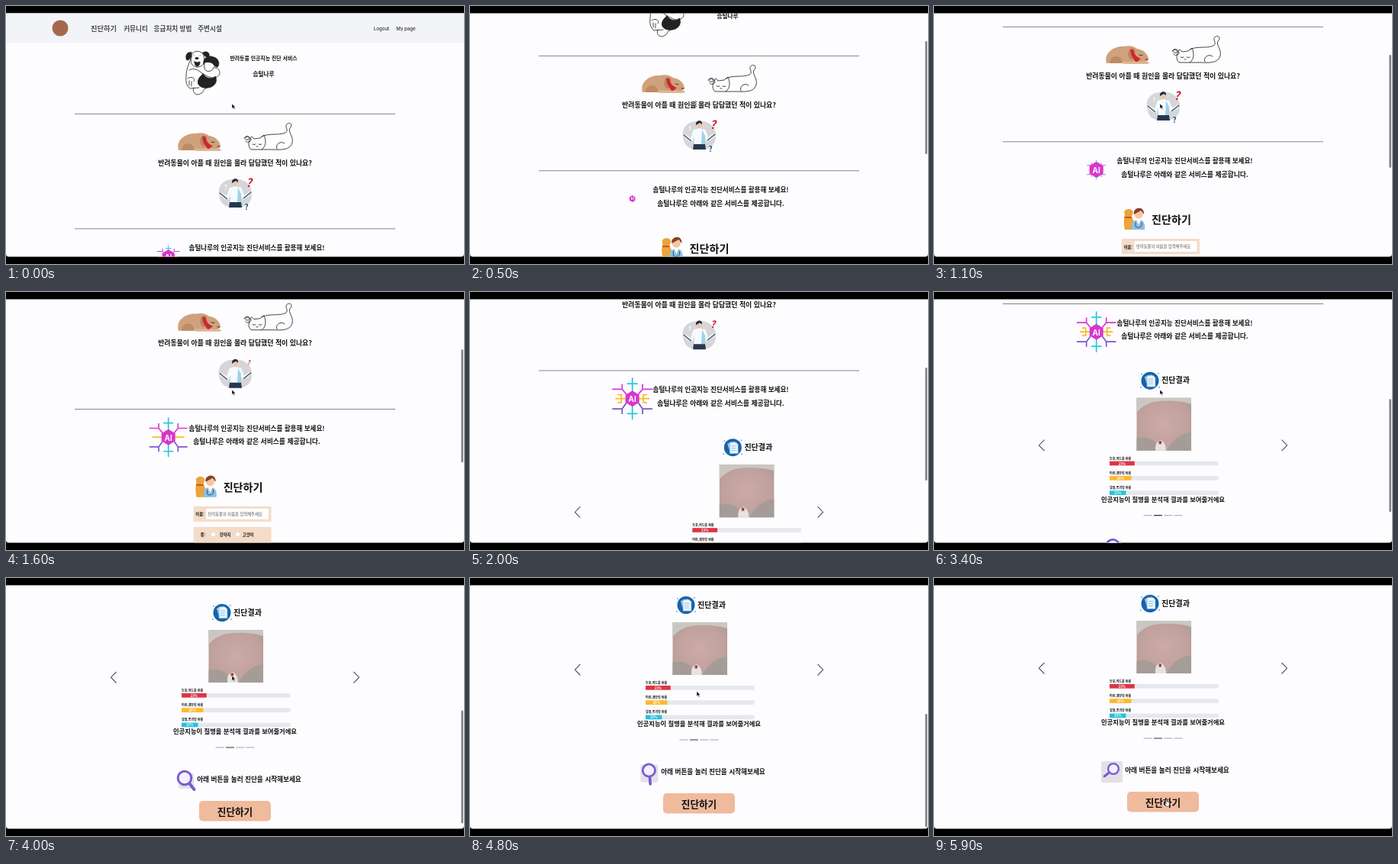
Write an HTML page that moves like this. It is 600 px wide and 338 px high and loops after 6 s.

```html
<!DOCTYPE html>
<html lang="ko">
<head>
<meta charset="utf-8">
<style>
  html, body { margin: 0; width: 100%; height: 100%; overflow: hidden; background: #000; }
  svg { display: block; width: 600px; height: 338px; }
  text { font: 700 8.8px "Noto Sans CJK KR", "Noto Sans CJK", sans-serif; text-anchor: middle; dominant-baseline: central; fill: #111; }
  .nav text { font-size: 8.6px; fill: #4a4a4c; }
  .nav .user { font: 500 6.1px Inter, sans-serif; fill: #333; }
  .ink { fill: none; stroke: #1b1b1b; stroke-width: .8; stroke-linecap: round; stroke-linejoin: round; }
  .ink .solid { fill: #222; }
  .small text { font-size: 4px; text-anchor: start; }
  .small .value { font-size: 4.4px; text-anchor: middle; fill: #fff; }
  .form text { font-size: 5.3px; }
  .rays { fill: none; stroke-width: 1.7; stroke-linecap: round; }
</style>
</head>
<body>
<svg viewBox="0 0 600 338">
  <defs>
    <clipPath id="window"><path d="M0 9.5H600V325Q600 328.5 596 328.5H4Q0 328.5 0 325Z"/></clipPath>
    <clipPath id="carousel"><rect x="90" y="370" width="420" height="210"/></clipPath>
    <radialGradient id="skin" cx=".5" cy=".5" r=".72">
      <stop offset="0" stop-color="#cbaaa7"/>
      <stop offset=".65" stop-color="#c0a09d"/>
      <stop offset="1" stop-color="#a39a96"/>
    </radialGradient>
  </defs>
  <g clip-path="url(#window)">
    <rect width="600" height="338" fill="#fdfcfe"/>
    <g id="page">
      <g class="nav">
        <rect y="9" width="600" height="39" fill="#f3f4f8"/>
        <circle cx="71" cy="29" r="10.5" fill="#a5684c"/>
        <text x="128" y="29" style="font-size:9.2px">진단하기</text>
        <text x="170" y="29">커뮤니티</text>
        <text x="218.5" y="29">응급처치 방법</text>
        <text x="267" y="29">주변시설</text>
        <text class="user" x="492" y="29">Logout</text>
        <text class="user" x="524" y="29">My page</text>
      </g>

      <!-- dog hugging a person -->
      <g class="ink">
        <path d="M243 66C240 76 236 82 236 92C235 100 237 105 241 108L253 107M243 66C243 57 258 57 259 66C262 74 258 80 250 80C243 79 241 74 243 66"/>
        <path class="solid" d="M243 61C237 59 234 66 237 71C241 71 243 66 243 61ZM258 61C264 58 267 62 266 66C262 68 259 65 258 61ZM247 73Q250 75 254 73Q254 79 250 79Q247 78 247 73Z"/>
        <ellipse class="solid" cx="250" cy="68.5" rx="2" ry="1.2"/>
        <path d="M246 65h.2M254 65h.2M260 76C258 84 264 88 270 84L273 79"/>
        <path class="solid" d="M259 76C257 67 267 64 272 67C278 68 281 76 277 80C273 80 272 75 268 74C264 73 261 73 259 76Z"/>
        <path class="solid" d="M258 89C249 96 249 105 259 107C270 109 279 101 274 92C270 97 262 95 258 89Z"/>
        <path d="M273 81C280 80 283 90 276 93C270 96 264 92 258 89M240 84C246 80 252 84 258 89M238 95C243 91 249 95 246 99M246 107C243 114 250 119 256 114C260 112 257 109 262 108M240 98v6M243 99v6"/>
      </g>
      <text x="337.5" y="68" style="font-size:6.9px">반려동물 인공지능 진단 서비스</text>
      <text x="337.5" y="88.5" style="font-size:7.6px">솜털나루</text>
      <path d="M90 141.4H510M90 291.8H510" stroke="#87878a"/>

      <!-- resting dog -->
      <path d="M226 189C222 175 236 166 249 167C256 165 262 167 266 170C275 171 281 178 281 184C279 188 272 189 266 188Z" fill="#cfa27c"/>
      <path d="M230 189C230 180 240 177 245 183L248 189Z" fill="#bd8c66"/>
      <path d="M258 169C252 174 254 182 259 185C263 180 265 173 262 170Z" fill="#b98560"/>
      <path d="M257 171Q258 181 265 188L271 183Q263 181 261 171Z" fill="#cf2433"/>
      <path d="M246 187H281Q283 190 279 190H248Z" fill="#ddb795"/>
      <path d="M269 178q2 1.5 4 .5M277 184h3" class="ink"/>

      <!-- resting cat -->
      <g class="ink">
        <path d="M335 171C345 166 357 170 366 166C372 163 363 157 369 154C373 152 376 156 372 160C369 165 377 171 375 179C373 187 365 189 350 188H321C316 184 318 175 322 171L325 174L333 173L338 169C341 176 341 184 335 188M355 187C352 181 360 176 365 180"/>
        <path d="M323 181q2 1.5 4 0M331 181q2 1.5 4 0M328 184h2M312 173c3-4 7-3 7 0s-6 3-6 0s8-1 8 2s-6 5-7 2"/>
      </g>
      <text x="300" y="205" style="font-size:8.9px">반려동물이 아플 때 원인을 몰라 답답했던 적이 있나요?</text>

      <!-- puzzled man -->
      <path d="M279 247C277 234 286 227 298 227C312 225 323 234 322 247C322 259 313 265 299 264C286 264 280 258 279 247Z" fill="#d6d6d9"/>
      <path d="M295 238L290 252L281 246M306 238L311 251L320 245" fill="none" stroke="#f5faff" stroke-width="4" stroke-linejoin="round"/>
      <path d="M290 253L280 245M311 252L321 244" fill="none" stroke="#33475f" stroke-width="1.3"/>
      <path d="M294 238L300 236L307 238L308 257H294Z" fill="#f5faff"/>
      <path d="M304 238L308 246V257H303Z" fill="#9fd2e6"/>
      <path d="M293 257H308L309 264H292Z" fill="#27384f"/>
      <ellipse cx="300" cy="232" rx="3" ry="4" fill="#efc5a6"/>
      <path d="M296 232C295 225 305 224 304 231L301 229Z" fill="#1f2b3a"/>
      <text id="askWhite" style="fill:#fff;font-size:8px">?</text>
      <text id="askRed" style="fill:#c5202b;font-size:15px;font-style:italic">?</text>
      <text id="askBlue" style="fill:#174a80;font-size:10px">?</text>

      <!-- AI chip -->
      <g id="rays" class="rays">
        <g id="branches">
          <path d="M-8-6L-13-12H-25M-13-12V-18" stroke="#d43bd0"/>
          <path d="M-8 6L-13 13H-25M-13 13V19" stroke="#7d58c4"/>
          <path d="M-9 0H-21" stroke="#f7bd25"/>
          <path class="fork" d="M-14 0V-5H-18M-14 0V5H-18" stroke="#f7bd25"/>
        </g>
        <use href="#branches" transform="scale(-1 1)"/>
        <path d="M0-9V-26M-6-19H6M0 9V26M-6 19H6" stroke="#25c9e0"/>
      </g>
      <g id="chip">
        <path d="M0-10.5L9-5V5L0 10.5L-9 5V-5Z" fill="#d935cf"/>
        <text y=".3" style="fill:#fff;font:700 10px Inter,sans-serif">AI</text>
      </g>
      <text x="328.5" y="316" style="font-size:8.55px">솜털나루의 인공지능 진단서비스를 활용해 보세요!</text>
      <text x="328.5" y="334">솜털나루은 아래와 같은 서비스를 제공합니다.</text>

      <g clip-path="url(#carousel)">
        <g id="formSlide">
          <path d="M250 407C248 398 249 390 250 387C246 380 259 377 261 384L259 390C263 396 262 402 262 407Z" fill="#eba53a"/>
          <path d="M250 391h9" stroke="#c8372f" stroke-width="1.6"/>
          <path d="M259 407C258 397 262 394 268 394C275 394 277 400 276 407Z" fill="#8dbfe2"/>
          <path d="M265 394L268 401L271 394Z" fill="#fff"/>
          <circle cx="268" cy="387" r="5.5" fill="#f7c6a1"/>
          <path d="M262 387C260 377 276 375 275 387L271 382Z" fill="#873f26"/>
          <path d="M264 397v6q4 3 8-1v-5" fill="none" stroke="#2a568c"/>
          <text x="311" y="393" style="font-size:14.1px">진단하기</text>
          <g class="form">
            <rect x="246" y="419" width="102" height="20" rx="1.5" fill="#f4dcc8"/>
            <rect x="262.500" y="422" width="82" height="14" rx="1.500" fill="#fff"/>
            <text x="254.500" y="429.500">이름:</text>
            <text x="300.500" y="429" style="font-weight:400;fill:#555">반려동물의 이름을 입력해주세요</text>
            <rect x="246" y="446" width="102" height="21" rx="1.5" fill="#f4dcc8"/>
            <text x="258.500" y="456">종:</text>
            <circle cx="272" cy="456" r="3" fill="#fff" stroke="#ccc" stroke-width=".5"/>
            <text x="287.500" y="456">강아지</text>
            <circle cx="304" cy="456" r="3" fill="#fff" stroke="#ccc" stroke-width=".5"/>
            <text x="317.500" y="456">고양이</text>
          </g>
        </g>
        <g id="resultSlide">
          <circle cx="283" cy="392.500" r="11.500" fill="#1763aa"/>
          <g id="papers" stroke="#5b9bd0" stroke-width=".6">
            <path d="M276 387l9-3 4 13-9 3Z" fill="#b9dcf5"/>
            <path d="M279 385h8l3 3v12h-11Z" fill="#eaf6ff"/>
            <path d="M281 390h6M281 393h6M281 396h6"/>
          </g>
          <path d="M271 384h2M293 383h2M270 401h2M294 401h2" stroke="#6db5e3" stroke-width="1.500"/>
          <text x="316.500" y="391" style="font-size:10px">진단결과</text>
          <g>
            <rect x="265.500" y="415" width="71.500" height="69" fill="url(#skin)"/>
            <path d="M265.500 415H337V423Q318 418 300 419Q278 419 265.500 434Z" fill="#cac7c1"/>
            <path d="M265.500 484V468Q280 463 291 474L290 484ZM337 484V460Q315 463 305 484Z" fill="#a59c97"/>
            <path d="M290 484Q289 472 297 470Q304 474 304 484Z" fill="#e6e2df"/>
            <rect x="294.500" y="471.500" width="3.500" height="4" fill="#a93d40"/>
          </g>
          <g id="bars" class="small"></g>
          <text x="300" y="547" style="font-size:8.3px">인공지능이 질병을 분석해 결과를 보여줄거에요</text>
        </g>
      </g>
      <path d="M144.500 470L137.500 477.200L144.500 484.500M455.500 470L462.500 477.200L455.500 484.500" fill="none" stroke="#55555a" stroke-width="1.100"/>
      <path d="M274.500 569H285.500M301.500 569H312.500M314.500 569H325.500" stroke="#a3a3a6"/>
      <path d="M288 569H299" stroke="#333" stroke-width="1.200"/>

      <rect id="lensBack" rx="2" fill="#e2e2e6"/>
      <g id="lens" stroke="#7a5bd3" stroke-linecap="round">
        <circle r="8.800" fill="#f4f1fd" stroke-width="3"/>
        <path d="M7 8L12.500 15" stroke-width="4"/>
      </g>
      <text x="318.500" y="610" style="font-size:8.650px">아래 버튼을 눌러 진단을 시작해보세요</text>
      <rect x="253" y="639" width="94" height="26.500" rx="5" fill="#f0ba9d"/>
      <text x="300" y="652" style="font-size:12.600px;font-weight:900">진단하기</text>
    </g>
    <rect id="thumb" x="596.300" width="2.700" height="148" rx="1.350" fill="#858587"/>
    <g id="cursor" stroke-linejoin="round">
      <path id="arrow" d="M0 0V6.500L1.600 5.100L2.700 7.500L3.800 7L2.700 4.700H4.700Z" fill="#000" stroke="#fff" stroke-width=".5"/>
      <path id="beam" d="M-1.500-3H1.500M0-3V4M-1.500 4H1.500" fill="none" stroke="#555" stroke-width=".7"/>
      <path id="hand" d="M0 0Q1-1 1.500 0V3L4.500 4V7L3.500 9H0L-2 5.500L0 6Z" fill="#fff" stroke="#222" stroke-width=".6"/>
    </g>
  </g>
</svg>
<script>
const $ = id => document.getElementById(id);
const clamp = (v, lo = 0, hi = 1) => Math.min(hi, Math.max(lo, v));
const ease = x => { x = clamp(x); return x * x * (3 - 2 * x); };
const place = (id, x, y, scale = 1, angle = 0) =>
  $(id).setAttribute('transform', `translate(${x} ${y}) rotate(${angle}) scale(${scale})`);
const show = (id, on) => $(id).setAttribute('opacity', +on);

// Linear interpolation through [time, value] points
function track(points, t) {
  const i = points.findIndex(p => p[0] > t);
  if (i < 0) return points[points.length - 1][1];
  const [t0, a] = points[i - 1], [t1, b] = points[i];
  return a + (b - a) * (t - t0) / (t1 - t0);
}

const SCROLL = [[0, 0], [100, 6], [500, 76], [700, 108], [800, 114], [1400, 114], [1600, 138.3],
  [2000, 188.8], [2900, 237], [3600, 292], [4000, 347], [4300, 352], [5000, 359]];
const RAYS = [[0, .58], [400, 0], [700, 0], [1500, .96], [2000, 1.03], [2900, 1]];
const CHIP = [[0, .9], [500, .42], [700, .42], [1100, 1]];
const TEXT_ROWS = [205, 316, 334];

$('bars').innerHTML = [
  ['농포,여드름 확률', 23, '#dc3545'], ['미란,궤양형 확률', 20, '#fdb92b'], ['결절,종괴형 확률', 15, '#22c3dd']
].map(([label, value, color], i) => {
  const y = 498 + i * 19.3, width = 142.5 * value / 100;
  return `<text x="230" y="${y - 4.2}">${label}</text>
    <rect x="230" y="${y}" width="142.5" height="5.6" fill="#e5e8ec"/>
    <rect x="230" y="${y}" width="${width}" height="5.6" fill="${color}"/>
    <text class="value" x="${230 + width / 2}" y="${y + 2.8}">${value}%</text>`;
}).join('');

function drawMan(t) {
  const phase = (t + 1500) % 3000;
  place('askRed', 318, 230, track([[0, .3], [100, .5], [500, .85], [800, 1]], phase));
  place('askWhite', 288, 236);
  place('askBlue', 315, 262);
  show('askWhite', phase >= 400);
  show('askBlue', phase >= 1000);
}

function drawLens(t) {
  const k = .5 - .5 * Math.cos(2 * Math.PI * (t - 4000) / 3800);
  const size = 20 + 8 * k, back = $('lensBack');
  back.setAttribute('x', 226 - 7 * k);
  back.setAttribute('y', 603 - 4 * k);
  back.setAttribute('width', size);
  back.setAttribute('height', size);
  place('lens', 234 + k, 609, 1 - .22 * k, 90 * k);
}

function drawCursor(t, scroll) {
  const move = ease((t - 4600) / 900);
  const x = 296 + 8 * move, y = 128 + 162 * move;
  const hand = y + scroll > 639;
  const beam = !hand && TEXT_ROWS.some(row => Math.abs(y + 2 + scroll - row) < 6);
  place('cursor', x, y);
  show('hand', hand);
  show('beam', beam);
  show('arrow', !hand && !beam);
}

function draw(t) {
  const scroll = track(SCROLL, t);
  place('page', 0, -scroll);
  place('formSlide', 420 * (1 - ease((t + 16) / 540) - ease((t - 1590) / 540)), 0);
  place('resultSlide', 420 * (1 - ease((t - 1590) / 540)), 0);
  place('papers', 0, .5 * Math.sin(t / 250));
  place('rays', 212.7, 328.5, track(RAYS, t));
  place('chip', 212.7, 328.5, track(CHIP, t));
  document.querySelector('.fork').setAttribute('opacity', ease((t - 1600) / 300));
  drawMan(t);
  drawLens(t);
  drawCursor(t, scroll);
  $('thumb').setAttribute('y', 10.3 + scroll * .47);
  show('thumb', track([[0, 0], [100, 1], [5200, 1], [5600, 0]], t));
}

function tick(now) {
  draw(Math.floor(now % 6000 / 100) * 100);
  requestAnimationFrame(tick);
}
requestAnimationFrame(tick);
</script>
</body>
</html>
```
